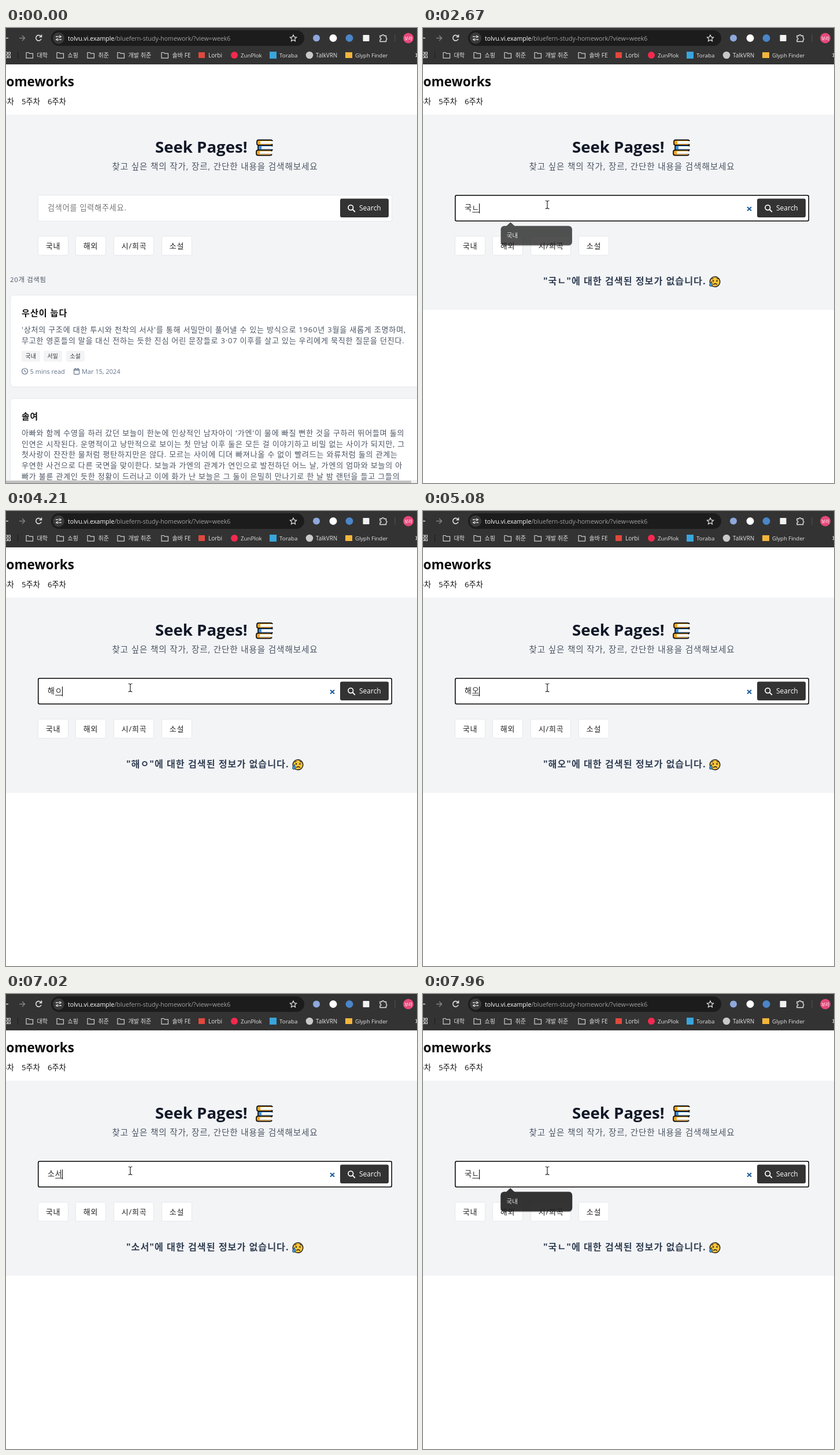
These frames come from a looping animation (711 px wide and 788 px high, 8000 ms). An HTML page:

```html
<!DOCTYPE html>
<html lang="ko">
<head>
<meta charset="utf-8">
<title>Book search</title>
<style>
  html, body { margin: 0; width: 100%; height: 100%; overflow: hidden; background: #fff; }
  svg { display: block; }
  text { font-family: "Open Sans", "Noto Sans CJK KR", "Noto Sans CJK", sans-serif; white-space: pre; }
  .bold { font-weight: 700; }
  .medium { font-weight: 500; }
  .wide { letter-spacing: .06em; }
</style>
</head>
<body>
<svg id="stage" width="711" height="788" viewBox="0 0 711 788"></svg>
<script>
const LOOP = 8000;
const stage = document.getElementById('stage');
const $ = id => document.getElementById(id);

const text = (x, y, size, fill, str, extra = '') =>
  `<text x="${x}" y="${y}" font-size="${size}" fill="${fill}" ${extra}>${str}</text>`;
const rect = (x, y, w, h, fill, r = 0, extra = '') =>
  `<rect x="${x}" y="${y}" width="${w}" height="${h}" rx="${r}" fill="${fill}" ${extra}/>`;
const dot = (x, y, r, fill, extra = '') =>
  `<circle cx="${x}" cy="${y}" r="${r}" fill="${fill}" ${extra}/>`;
const line = (d, color, width = 1.4, extra = '') =>
  `<path d="${d}" fill="none" stroke="${color}" stroke-width="${width}" ${extra}/>`;
const boxed = (x, y, w, h, r) => rect(x + .5, y + .5, w - 1, h - 1, '#fff', r, 'stroke="#e5e7eb"');

const BOLD = 'class="bold"', MEDIUM = 'class="medium"', WIDE = 'class="wide"', BOLD_WIDE = 'class="bold wide"';

function browserBar() {
  const ink = '#e3e3e3';
  const folders = [[34, '대학'], [87, '쇼핑'], [140, '취준'], [192, '개발 취준'], [268, '솔바 FE']];
  return rect(0, 0, 711, 63, '#333') + rect(78, 4, 438, 27, '#1c1c1c', 13.5)
    + line('M0 17.5H4', ink)
    + line('M23 17.5H32M28 13l4.5 4.5L28 22', '#858585')
    + line('M60.5 14.5A4.8 4.8 0 1 0 61 19M61.5 11.5v4h-4', ink, 1.6)
    + dot(91, 17.5, 10, '#3a3a3a')
    + line('M86 15h4M93 15h3M86 20h3M92 20h4', ink) + dot(93, 15, 1.6, 'none', `stroke="${ink}"`)
    + dot(89, 20, 1.6, 'none', `stroke="${ink}"`)
    + `<text x="107" y="21.5" font-size="10.6" fill="#fff" class="medium">tolvu.vi.example<tspan fill="#a0a0a0" font-weight="400">/bluefern-study-homework/?view=week6</tspan></text>`
    + line('M497 12l1.7 3.6 3.9.5-2.9 2.7.8 3.9-3.5-2-3.5 2 .8-3.9-2.9-2.7 3.9-.5z', ink, 1.2)
    + dot(537, 17.5, 6, '#8fa8dc') + dot(566, 17.5, 6.5, '#fff') + dot(594, 17.5, 6.5, '#4a86c8')
    + rect(617.5, 12, 11, 11, '#f1f1f1', 1)
    + line('M647 13.5h3.2a1.9 1.9 0 0 1 3.8 0h3.5v3.7a1.9 1.9 0 0 1 0 3.6v2.7h-10.5v-3a1.8 1.8 0 0 0 0-3.6z', ink)
    + rect(672.5, 11, 1, 13, '#555') + dot(696, 17.5, 9, '#e5487a')
    + text(696, 20.5, 7.5, '#fff', '보라', 'text-anchor="middle"')
    + [0, 5].map(x => [42, 48].map(y => rect(x - 1, y, 3.5, 3.5, 'none', 0, `stroke="${ink}"`)).join('')).join('')
    + rect(20, 41, 1, 12, '#1c1c1c')
    + folders.map(([x, name]) => line(`M${x + 1} 42.5h4l1.5 1.7h6v8h-11.5z`, '#d0d0d0', 1.2)
        + text(x + 19.5, 50.7, 10.1, ink, name)).join('')
    + rect(333, 42, 11, 10, '#e0483c') + text(350, 50.7, 10, ink, 'Lorbi')
    + dot(395, 47, 6, '#f5294e') + text(406, 50.7, 9.7, ink, 'ZunPlok')
    + rect(456, 41, 12, 12, '#39a5dc') + text(473, 50.7, 9.8, ink, 'Toraba')
    + dot(525, 47, 6.3, '#c9c9c9') + text(536, 50.7, 9.9, ink, 'TalkVRN')
    + rect(587, 42, 12, 10, '#f2b63c') + text(604, 50.7, 9.5, ink, 'Glyph Finder')
    + line('M709 44l2.5 3-2.5 3', ink);
}

function bookStack() {
  const book = (x, y, w, color) =>
    rect(x, y, w, 9, color, 3, 'stroke="#151515" stroke-width="1.8"')
    + rect(x + 6, y + 2, w - 5, 5, '#fff') + line(`M${x + 6} ${y + 6}h${w - 6}`, '#c9c9c9', 1);
  return book(434, 194, 27, '#f5a623') + book(436, 203, 25, '#3d8fd6') + book(433, 211.5, 27, '#f5a623');
}

function header() {
  return rect(0, 63, 711, 87, '#fff') + rect(0, 150, 711, 338, '#f3f4f6')
    + text(118, 101, 22.5, '#0a0a0a', 'homeworks', BOLD + ' text-anchor="end"')
    + text(14, 132, 13.2, '#111', '4주차', 'text-anchor="end"')
    + text(27, 132, 13.2, '#111', '5주차') + text(72, 132, 13.2, '#111', '6주차')
    + text(258, 216, 27.6, '#111827', 'Seek Pages!', BOLD) + bookStack()
    + text(361.5, 245, 14.6, '#4b5563', '찾고 싶은 책의 작가, 장르, 간단한 내용을 검색해보세요', WIDE + ' text-anchor="middle"');
}

function results() {
  const body = '#4b5563', meta = '#64748b';
  const paragraph = (y, step, lines) => lines.map((str, i) => text(27, y + i * step, 13.05, body, str, WIDE)).join('');
  return rect(0, 480, 711, 308, '#f3f4f6')
    + text(7, 440.3, 11.4, body, '', WIDE + ' id="count"')
    + boxed(7, 462, 760, 160, 6) + boxed(7, 641, 760, 200, 6)
    + text(27, 499.2, 15.2, '#111', '우산이 눕다', BOLD_WIDE)
    + paragraph(526.7, 19, [
      "'상처의 구조에 대한 투시와 천착의 서사'를 통해 서밀만이 풀어낼 수 있는 방식으로 1960년 3월을 새롭게 조명하며,",
      '무고한 영혼들의 말을 대신 전하는 듯한 진심 어린 문장들로 3·07 이후를 살고 있는 우리에게 묵직한 질문을 던진다.'])
    + [[27, '국내'], [65, '서밀'], [104, '소설']].map(([x, tag]) =>
        rect(x, 559, 32, 19, '#f3f4f6', 3) + text(x + 6.5, 572.3, 10, '#333', tag)).join('')
    + dot(32.5, 594.5, 5, 'none', `stroke="${meta}" stroke-width="1.2"`) + line('M32.5 591.5v3.3l2.2 1.2', meta, 1.1)
    + text(41.5, 599, 11, meta, '5 mins read')
    + rect(117.6, 590.6, 9, 9, 'none', 1, `stroke="${meta}" stroke-width="1.2"`)
    + line('M117.6 592.5h9M120 589v2M124.4 589v2', meta, 1.5)
    + text(131, 599, 11, meta, 'Mar 15, 2024')
    + text(27, 677.7, 14.8, '#111', '솔여', BOLD_WIDE)
    + paragraph(705.7, 18.8, [
      "아빠와 함께 수영을 하러 갔던 보늘이 한눈에 인상적인 남자아이 '가엔'이 물에 빠질 뻔한 것을 구하러 뛰어들며 둘의",
      '인연은 시작된다. 운명적이고 낭만적으로 보이는 첫 만남 이후 둘은 모든 걸 이야기하고 비밀 없는 사이가 되지만, 그',
      '첫사랑이 잔잔한 물처럼 평탄하지만은 않다. 모르는 사이에 디뎌 빠져나올 수 없이 빨려드는 와류처럼 둘의 관계는',
      '우연한 사건으로 다른 국면을 맞이한다. 보늘과 가엔의 관계가 연인으로 발전하던 어느 날, 가엔의 엄마와 보늘의 아',
      '빠가 불륜 관계인 듯한 정황이 드러나고 이에 화가 난 보늘은 그 둘이 은밀히 만나기로 한 날 밤 랜턴을 들고 그들의'])
    + rect(0, 783, 711, 5, '#f1f1f1') + rect(0, 784, 701, 4, '#c1c1c1');
}

function emptyMessage() {
  return text(208, 444.3, 16.2, '#334155', '', BOLD_WIDE + ' id="message"')
    + '<g id="face">' + dot(505, 439.5, 8.8, '#fcc53a', 'stroke="#222" stroke-width="1.5"')
    + dot(502, 438, 1.3, '#222') + dot(508.5, 438, 1.3, '#222')
    + line('M502 444.5q3.5-3.5 7 0M499.5 435l3-1.5M508 433.5l3 1.5', '#222', 1.3)
    + '<path d="M499 439q-6 7-1.5 8.5q5 0 1.5-8.5" fill="#3b9be8" stroke="#222" stroke-width=".8"/></g>';
}

function searchForm() {
  const chips = [[55, 53, '국내'], [120, 53, '해외'], [186, 70, '시/희곡'], [269, 53, '소설']];
  return boxed(55, 289, 613, 46, 2)
    + rect(55.75, 289.75, 611.5, 44.5, '#fff', 2.5, 'id="ring" stroke="#000" stroke-width="1.5"')
    + text(72, 316.3, 13.1, '#757575', '검색어를 입력해주세요.', WIDE + ' id="placeholder"')
    + text(72, 316.3, 13.1, '#222', '', WIDE + ' id="query"')
    + rect(0, 318.5, 12, 1, '#222', 0, 'id="underline"') + rect(0, 304, 1, 17, '#000', 0, 'id="caret"')
    + line('M561 310l7 6.5M568 310l-7 6.5', '#1c5c9c', 2, 'id="clear"')
    + rect(578, 295.5, 84, 32.5, '#333', 3)
    + dot(596.3, 311, 4.3, 'none', 'stroke="#fff" stroke-width="1.7"') + line('M599.5 314.2l4.3 4.3', '#fff', 1.9)
    + text(611, 316, 12, '#fff', 'Search', MEDIUM)
    + chips.map(([x, w, name]) => boxed(x, 360, w, 34, 3) + text(x + 13.8, 381.8, 13, '#222', name, WIDE)).join('');
}

function popupMarkup(items) {
  const h = 5 + items.length * 29;
  return rect(134, 344, 124.5, h, '#000', 6, 'opacity=".2"')
    + `<path d="M143 343.5l8-7.5l8 7.5z" fill="#1f1f1f"/>` + rect(134, 342.5, 124.5, h, '#1f1f1f', 6)
    + items.map((item, i) => text(144, 363.4 + i * 28.8, 10.8, '#e3e3e3', item)).join('');
}

stage.innerHTML = rect(0, 0, 711, 788, '#fff') + browserBar() + header()
  + `<g id="results">${results()}</g><g id="empty">${emptyMessage()}</g>` + searchForm()
  + '<g id="popup"></g>'
  + '<path id="arrow" d="M0 0v16l3.7-3.5 2.4 5.7 2.4-1-2.4-5.6h5.2z" fill="#fff" stroke="#000"/>'
  + line('M-3.5-7q3 0 3.5 1.5q.5-1.5 3.5-1.5M0-5.5v11M-3.5 7q3 0 3.5-1.5q.5 1.5 3.5 1.5', '#222', 1.2, 'id="beam"');

const FOCUS = 1130, CARET_START = 1210, BLINK = 530;
const typing = [
  [CARET_START, ''], [2270, 'ㄱ'], [2400, '구'], [2470, '국'], [2670, '국ㄴ'], [2740, '국내'],
  [3410, '국ㄴ'], [3670, '국'], [3740, ''], [3940, 'ㅎ'], [4070, '해'], [4210, '해ㅇ'], [4340, '해오'],
  [4550, '해외'], [5080, '해오'], [5350, '해'], [5410, ''], [5820, 'ㅅ'], [5950, '소'], [6080, '소서'],
  [6150, '소설'], [7020, '소서'], [7220, '소'], [7290, ''], [7690, 'ㄱ'], [7760, '구'], [7830, '국'], [7960, '국ㄴ']];
const hits = { '': 20, '국': 16, '국내': 12, '해': 7, '해외': 8, '소': 17, '소설': 13 };
const popups = [
  [1190, 2270, ['국내', '시/희곡', '소설', '평화']], [2470, 2670, ['국내']], [3650, 3740, ['국내']],
  [5950, 6080, ['소설']], [7220, 7290, ['소설']], [7880, 9000, ['국내']]];

const clamp = v => Math.max(0, Math.min(1, v));
const show = (id, on) => $(id).setAttribute('visibility', on ? 'visible' : 'hidden');
const mix = (a, b, p) => a + (b - a) * p;

function drawPointer(t) {
  const p = clamp((Math.floor((t - 260) / 66.7) + 1) / 13);
  const sweep = clamp(p / .75), ease = 1 - (1 - sweep) ** 2, settle = clamp((p - .75) / .25);
  const x = mix(mix(610, 182, ease), 215, settle), y = mix(mix(704, 285, ease), 306, settle);
  const overInput = y > 289 && y < 334;
  show('arrow', t >= 260 && !overInput);
  show('beam', t >= 260 && overInput);
  for (const id of ['arrow', 'beam']) $(id).setAttribute('transform', `translate(${x} ${y})`);
}

let shownItems;
function drawPopup(t) {
  const current = popups.filter(([open]) => t >= open).pop();
  show('popup', current);
  if (!current) return;
  const [open, close, items] = current;
  const fadeOut = t < close ? 1 : 1 - clamp((t - close + 45) / 200);
  const alpha = clamp((t - open) / 90) * fadeOut, scale = mix(.96, 1, alpha);
  if (items !== shownItems) $('popup').innerHTML = popupMarkup(shownItems = items);
  $('popup').setAttribute('opacity', alpha);
  $('popup').setAttribute('transform', `translate(196 360) scale(${scale}) translate(-196 -360)`);
}

function draw(t) {
  const [since, query] = typing.filter(([at]) => t >= at).pop() || typing[0];
  const found = query in hits, caretX = 72 + query.length * 12.88;
  show('results', found);
  show('empty', !found);
  $('count').textContent = `${hits[query]}개 검색됨`;
  $('message').textContent = `"${query}"에 대한 검색된 정보가 없습니다.`;
  const shift = (2 - query.length) * 8;
  $('message').setAttribute('x', 208 + shift);
  $('face').setAttribute('transform', `translate(${-shift} 0)`);

  show('ring', t >= FOCUS);
  show('placeholder', !query);
  show('clear', query);
  show('underline', query);
  $('query').textContent = query;
  $('underline').setAttribute('x', caretX - 12.5);
  $('caret').setAttribute('x', Math.floor(caretX));
  show('caret', t >= CARET_START && (t - since) % (2 * BLINK) < BLINK);
  drawPopup(t);
  drawPointer(t);
}

function tick() {
  draw(performance.now() % LOOP);
  requestAnimationFrame(tick);
}
tick();
</script>
</body>
</html>
```
